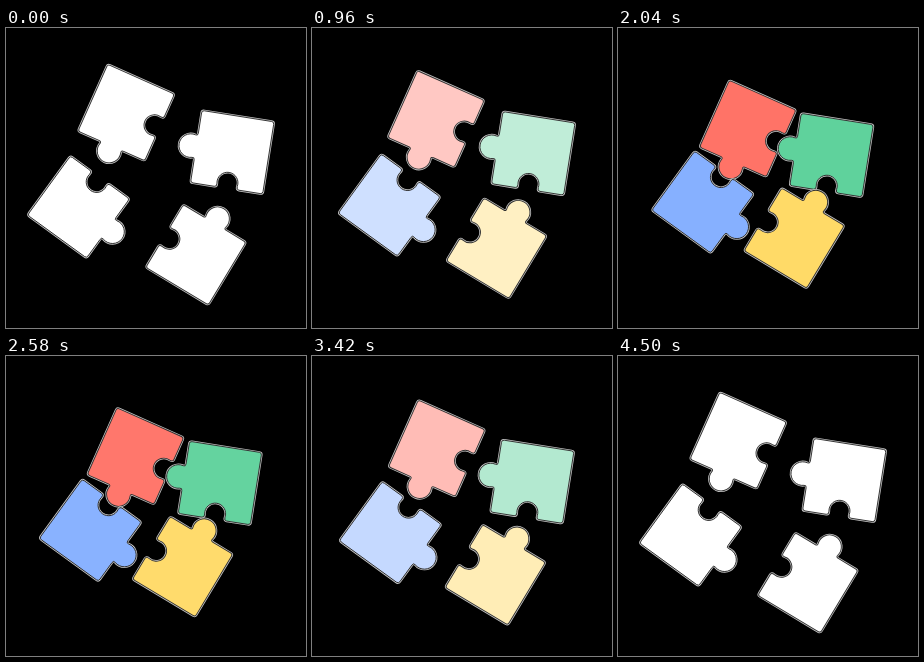
An HTML page that plays this animation: 300x300 px, repeating every 5.4 s.

```html
<!DOCTYPE html>
<html lang="en">
<head>
<meta charset="utf-8">
<title>Puzzle pieces</title>
<style>
  html, body { margin: 0; width: 100%; height: 100%; overflow: hidden; background: #000; }
  svg { display: block; width: 100%; height: 100%; }
</style>
</head>
<body>
<svg viewBox="0 0 300 300">
  <defs>
    <!-- notch on the right side, tab at the bottom -->
    <path id="shape" stroke-linejoin="round" d="M-34 -36.5 H34 Q36.5 -36.5 36.5 -34 V-12.5
      Q36.5 -9.7 33 -10.3 A10.5 10.5 0 1 0 33 10.3 Q36.5 9.7 36.5 12.5 V34
      Q36.5 36.5 34 36.5 H13.5 Q10.6 36.5 11.4 39 A11.8 11.8 0 1 1 -11.4 39 Q-10.6 36.5 -13.5 36.5
      H-34 Q-36.5 36.5 -36.5 34 V-34 Q-36.5 -36.5 -34 -36.5 Z"/>
  </defs>
</svg>
<script>
const LOOP = 5400, HALF = 2250, STEP = 30;
const svg = document.querySelector('svg');

// start centre, travel to the closest position, turn, full colour
const pieces = [
  { at: [120.2, 84.6], move: [9.8, 16.3], turn: 24, color: [255, 112, 100] },
  { at: [226.3, 124.2], move: [-13, 3], turn: 99, color: [92, 209, 154] },
  { at: [189.9, 226.8], move: [-14, -17], turn: 211, color: [255, 217, 100] },
  { at: [72.5, 179], move: [12.5, -5], turn: 306, color: [131, 174, 255] }
];

function add(parent, tag, attrs = {}) {
  const node = document.createElementNS('http://www.w3.org/2000/svg', tag);
  for (const key in attrs) node.setAttribute(key, attrs[key]);
  return parent.appendChild(node);
}

// light rim outside a thin dark outline
for (const piece of pieces) {
  piece.group = add(svg, 'g');
  add(piece.group, 'use', { href: '#shape', stroke: '#c4c4c4', 'stroke-width': 2.4 });
  piece.face = add(piece.group, 'use', { href: '#shape', stroke: '#303030', 'stroke-width': 0.9 });
}

function draw(now) {
  const time = Math.floor((now % LOOP) / STEP) * STEP;
  const near = (1 - Math.cos(Math.PI * Math.min(time, 2 * HALF) / HALF)) / 2;
  for (const { at, move, turn, color, group, face } of pieces) {
    const [x, y] = at.map((start, i) => start + move[i] * near);
    const fill = color.map(c => Math.round(255 + (c - 255) * near));
    group.setAttribute('transform', `translate(${x} ${y}) rotate(${turn})`);
    face.setAttribute('fill', `rgb(${fill})`);
  }
}

const begin = performance.now();
function tick() {
  draw(performance.now() - begin);
  requestAnimationFrame(tick);
}
tick();
</script>
</body>
</html>
```
